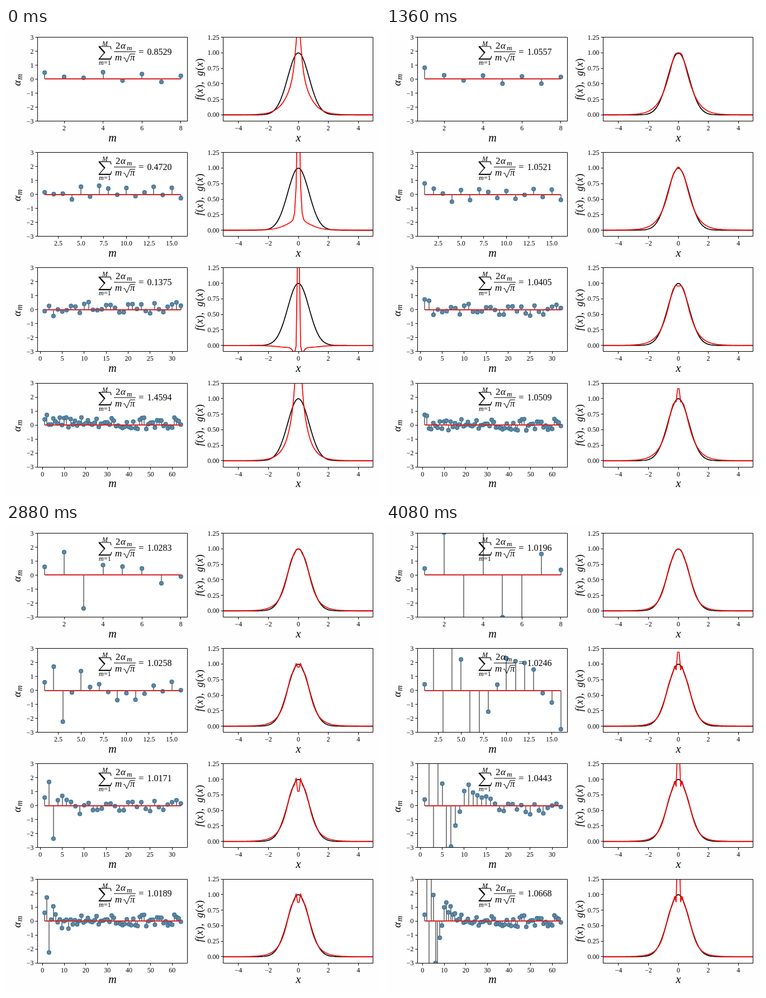
Animation of 669 by 837 pixels, one loop 4120 ms. Source, as an HTML page with a canvas:

```html
<!DOCTYPE html>
<html lang="en">
<head>
<meta charset="utf-8">
<title>Fitting a Gaussian with sech² pulses</title>
<style>
  html, body { margin: 0; width: 100%; height: 100%; overflow: hidden; background: #fefefe; }
  canvas { display: block; width: 669px; height: 837px; }
</style>
</head>
<body>
<canvas id="stage" width="669" height="837"></canvas>
<script>
const ctx = document.getElementById('stage').getContext('2d');
const STEP = 40, STEPS = 103;
const SERIF = '"Liberation Serif", "Noto Serif", serif';

// Each row fits with `count` pulses. The leading weights are given,
// the rest are random; the first is then tuned to give the starting sum.
const ROWS = [
  { count: 8, sum: .8529, head: [.45, .17, .1, .5, -.1, .37, -.2, .24], tick: [2, 2] },
  { count: 16, sum: .4720, head: [.18, .02, .05, -.36, .55, -.15, .62, .42], tick: [2.5, 2.5], digits: 1 },
  { count: 32, sum: .1375, head: [-.03, .27, -.45, .02, -.13, -.03, .27, .22], tick: [0, 5] },
  { count: 64, sum: 1.4594, head: [.4, .72, .03, .03, .47, .25, .1, .53], tick: [0, 10] }
];

// Pace of the fit: the second weight of the first row at some steps.
const PACE = [[20, .2], [47, .65], [63, 1.22], [72, 1.65], [88, 2.45], [102, 3.05]];

const grid = n => Array.from({ length: n }, (_, i) => -5 + 10 * i / (n - 1));
const FIT_X = grid(101), PLOT_X = grid(100);
const NORM = 2 / Math.sqrt(Math.PI);
const gauss = x => Math.exp(-x * x);
const pulse = (m, x) => 1 / Math.cosh(m * x) ** 2;
const dot = (a, b) => a.reduce((s, v, i) => s + v * b[i], 0);
const mix = (a, x) => a.reduce((s, v, i) => s + v * pulse(i + 1, x), 0);
const area = a => NORM * a.reduce((s, v, i) => s + v / (i + 1), 0);

function random(seed) {
  const s = Math.sin(seed * 127.1 + 11.7) * 43758.5453;
  return s - Math.floor(s);
}

// Jacobi eigenvalues and eigenvectors of a symmetric matrix.
function eigen(A) {
  const n = A.length;
  const V = A.map((_, i) => A.map((_, j) => +(i === j)));
  for (let sweep = 0; sweep < 12; sweep++) {
    for (let p = 0; p < n; p++) for (let q = p + 1; q < n; q++) {
      if (Math.abs(A[p][q]) < 1e-18) continue;
      const h = (A[q][q] - A[p][p]) / (2 * A[p][q]);
      const t = (h < 0 ? -1 : 1) / (Math.abs(h) + Math.sqrt(h * h + 1));
      const c = 1 / Math.sqrt(t * t + 1), s = t * c;
      for (const B of [A, V]) for (const r of B) {
        const u = r[p], v = r[q];
        r[p] = c * u - s * v;
        r[q] = s * u + c * v;
      }
      for (let k = 0; k < n; k++) {
        const u = A[p][k], v = A[q][k];
        A[p][k] = c * u - s * v;
        A[q][k] = s * u + c * v;
      }
    }
  }
  return { values: A.map((r, i) => r[i]), vectors: A.map((_, j) => V.map(r => r[j])) };
}

// Gradient descent on the squared error, solved mode by mode.
function prepare(row, index) {
  row.index = index;
  row.start = Array.from({ length: row.count },
    (_, i) => row.head[i] ?? -.3 + .85 * random(i + 100 * index));
  row.start[0] += (row.sum - area(row.start)) / NORM;
  const basis = row.start.map((_, i) => FIT_X.map(x => pulse(i + 1, x)));
  const miss = FIT_X.map(x => gauss(x) - mix(row.start, x));
  const pull = basis.map(b => dot(b, miss));
  const { values, vectors } = eigen(basis.map(a => basis.map(b => dot(a, b))));
  const floor = 1e-13 * Math.max(...values);
  row.modes = values
    .map((rate, i) => ({ rate, vector: vectors[i], force: dot(vectors[i], pull) }))
    .filter(m => m.rate > floor);
}

function weights(row, time) {
  const a = row.start.slice();
  for (const { rate, vector, force } of row.modes) {
    const gain = -Math.expm1(-rate * time) / rate * force;
    for (let i = 0; i < a.length; i++) a[i] += gain * vector[i];
  }
  return a;
}

// Logarithms of the descent time at which each pace level is reached.
function findPace() {
  let log = -10;
  return PACE.map(([step, level]) => {
    while (log < 24 && weights(ROWS[0], Math.exp(log))[1] < level) log += .01;
    return [step, log];
  });
}

function descentTime(k) {
  let i = 0;
  while (i < pace.length - 2 && k > pace[i + 1][0]) i++;
  const [k0, l0] = pace[i], [k1, l1] = pace[i + 1];
  const slope = (l1 - l0) / (k1 - k0);
  if (k >= k0) return Math.exp(l0 + slope * (k - k0));
  return Math.exp(l0) * Math.expm1(slope * k) / Math.expm1(slope * k0);
}

function text(s, x, y, size, align = 'center', style = '') {
  ctx.font = `${style} ${size}px ${SERIF}`;
  ctx.textAlign = align;
  ctx.fillStyle = '#000';
  ctx.fillText(s, x, y);
}
const italic = (s, x, y, size, align) => text(s, x, y, size, align, 'italic');
const label = (v, digits = 0) => v.toFixed(digits).replace('-', '\u2212');

function line(points, color, width) {
  ctx.beginPath();
  points.forEach(([x, y]) => ctx.lineTo(x, y));
  ctx.strokeStyle = color;
  ctx.lineWidth = width;
  ctx.lineJoin = 'round';
  ctx.stroke();
}

function upright(x, y, draw) {
  ctx.save();
  ctx.translate(x, y);
  ctx.rotate(-Math.PI / 2);
  draw();
  ctx.restore();
}

function ticks(from, by, to) {
  const list = [];
  for (let v = from; v <= to; v += by) list.push(v);
  return list;
}

// A framed plot: white ground, clipped content, then frame, ticks and labels.
function axes(x, top, xt, yt, xd, yd, px, py, content) {
  const y = Math.floor(top) + .5;
  ctx.fillStyle = '#fff';
  ctx.fillRect(x, y, 268, 150);
  ctx.save();
  ctx.beginPath();
  ctx.rect(x, y, 268, 150);
  ctx.clip();
  content();
  ctx.restore();
  ctx.strokeStyle = '#000';
  ctx.lineWidth = 1;
  ctx.strokeRect(x, y, 268, 150);
  for (const v of xt) {
    const p = Math.floor(px(v)) + .5;
    line([[p, y + 150], [p, y + 154]], '#000', 1);
    text(label(v, xd), px(v), y + 166, 12);
  }
  for (const v of yt) {
    const p = Math.floor(py(v)) + .5;
    line([[x, p], [x - 4, p]], '#000', 1);
    text(label(v, yd), x - 7, py(v) + 4, 12, 'right');
  }
}

function formula(y, sum) {
  italic('M', 177, y - 10, 12);
  line([[188, y - 4], [187, y - 9], [166, y - 9], [176, y + 2.5], [166, y + 14], [187, y + 14], [189, y + 8]], '#000', 1.2);
  line([[167, y - 8.5], [177, y + 2.5]], '#000', 2.2);
  line([[167, y + 13.3], [187, y + 13.3]], '#000', 1.6);
  italic('m', 166, y + 24, 12, 'left');
  text('=1', 175, y + 24, 12, 'left');
  text('2', 196, y - 5, 17, 'left');
  italic('α', 205, y - 5, 17, 'left');
  italic('m', 216, y - 2, 13, 'left');
  line([[193, y + .5], [232, y + .5]], '#000', 1);
  italic('m', 195, y + 16, 17, 'left');
  line([[210, y + 12], [212, y + 11], [216, y + 19], [222, y + 4.5], [231, y + 4.5]], '#000', 1);
  italic('π', 222, y + 16, 17, 'left');
  text('=', 237, y + 5.5, 17, 'left');
  text(label(sum, 4), 252.5, y + 5.5, 16, 'left');
}

function drawRow(row, time) {
  const a = weights(row, time);
  const M = row.count, top = 16.5 + 206.17 * row.index;
  const mx = m => 69.2 + 243.6 * (m - 1) / (M - 1);
  const ay = v => top + 75 - 25 * v;
  const gx = x => 523 + 26.8 * x;
  const gy = v => top + 150 - (v + .1) * 150 / 1.35;
  const base = Math.round(ay(0) - .1);

  axes(56.5, top, ticks(...row.tick, M), ticks(-3, 1, 3), row.digits, 0, mx, ay, () => {
    a.forEach((v, i) => {
      const x = Math.round(mx(i + 1));
      line([[x, base], [x, ay(v)]], '#666', 1.6);
    });
    a.forEach((v, i) => {
      ctx.beginPath();
      ctx.arc(mx(i + 1), ay(v), 3.4, 0, 7);
      ctx.fillStyle = '#808080';
      ctx.fill();
      ctx.strokeStyle = '#1f77b4';
      ctx.lineWidth = 1.3;
      ctx.stroke();
    });
    line([[mx(1), base], [mx(M), base]], '#d62728', 1.8);
    formula(top + 25.5, area(a));
  });
  italic('m', 190.5, top + 186, 20);
  upright(26, top + 87, () => {
    italic('α', 0, 0, 19, 'left');
    italic('m', 11, 3, 14, 'left');
  });

  axes(388.5, top, ticks(-4, 2, 4), ticks(0, .25, 1.25), 0, 2, gx, gy, () => {
    line(PLOT_X.map(x => [gx(x), gy(gauss(x))]), '#000', 1.7);
    line(PLOT_X.map(x => [gx(x), gy(mix(a, x))]), '#f00', 1.7);
  });
  italic('x', 523, top + 186, 20);
  upright(352, top + 112.5, () => {
    let x = 0;
    for (const c of 'f(x),\u2009 g(x)') {
      (/[a-z]/.test(c) ? italic : text)(c, x, 0, 18, 'left');
      x += ctx.measureText(c).width + .8;
    }
  });
}

ROWS.forEach(prepare);
const pace = findPace();

let shown = -1;
const begin = performance.now();
function tick() {
  const k = Math.floor((performance.now() - begin) / STEP) % STEPS;
  if (k !== shown) {
    shown = k;
    ctx.fillStyle = '#fefefe';
    ctx.fillRect(0, 0, 669, 837);
    const time = descentTime(k);
    ROWS.forEach(row => drawRow(row, time));
  }
  requestAnimationFrame(tick);
}
tick();
</script>
</body>
</html>
```
